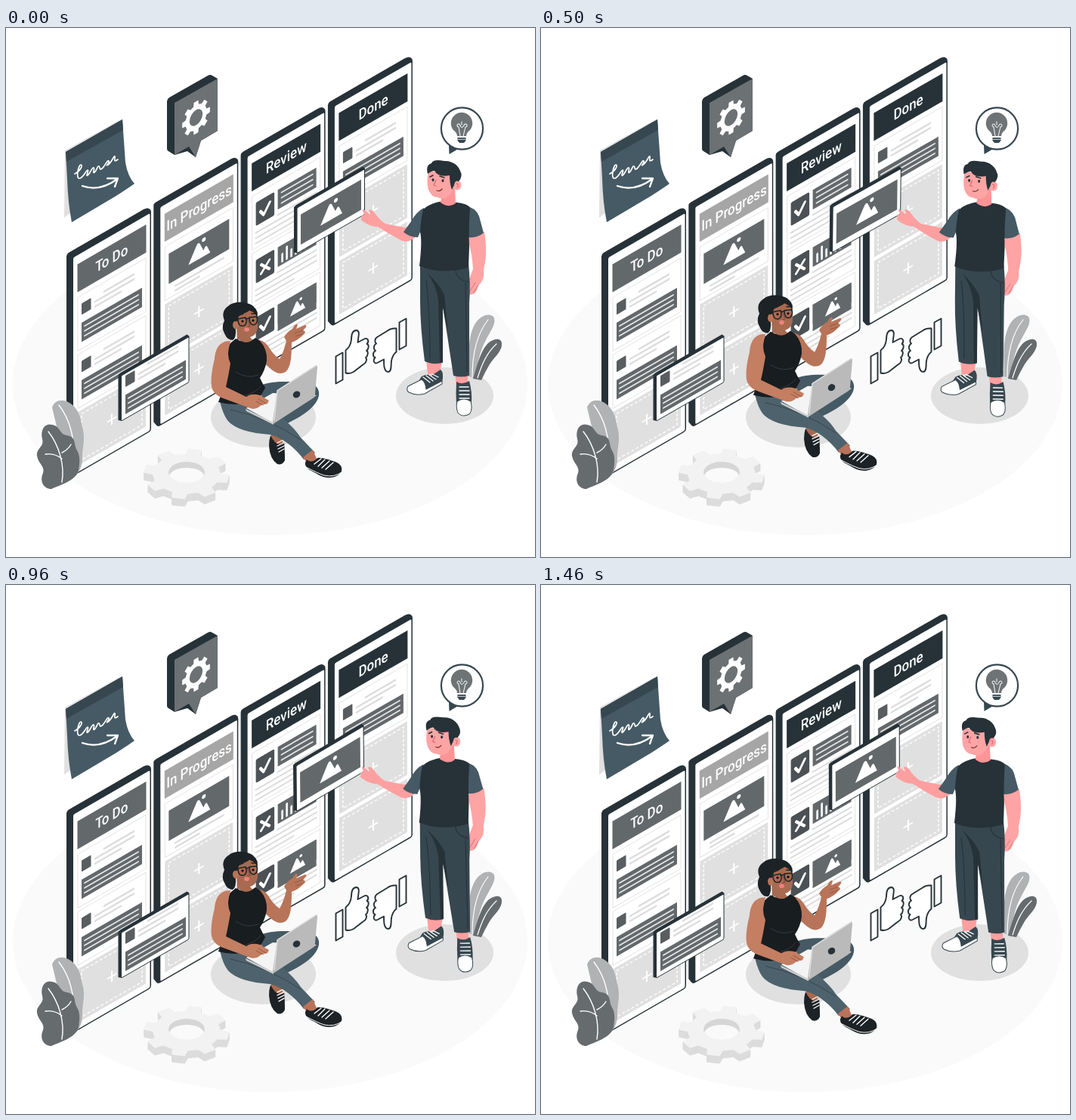
These frames come from a looping animation (700x700 px, 1500 ms). An HTML page:

```html
<!DOCTYPE html>
<html lang="en">
<head>
<meta charset="utf-8">
<title>Task board</title>
<style>
html,body{margin:0;width:100%;height:100%;overflow:hidden;background:#fff}
svg{display:block;width:100vw;height:100vh}
text{font:500 19.6px Roboto,Arial,sans-serif;fill:#fff;text-anchor:middle}
.line{fill:none;stroke-linecap:round;stroke-linejoin:round}
.w{stroke:#fff}
.d{stroke:#263238}
</style>
</head>
<body>
<svg viewBox="0 0 700 700">
<defs>
  <g id="board">
    <path fill="#263238" d="M0 3Q0 0 3 0H102Q107 0 110 4Q112 6 112 9V296Q112 299 109 299H9Q6 299 4 296L0 289Z"/>
    <rect x="9" y="10" width="101.5" height="287.3" rx="2" fill="#fff"/>
  </g>
  <rect id="frame" x="15" y="66" width="90" height="71" fill="#fff" stroke="#e4e4e4"/>
  <g id="notes">
    <rect x="20" y="77" width="12.5" height="15" rx="1" fill="#585d60"/>
    <path class="line" stroke="#dcdcdc" stroke-width="2.6" d="M50 78.500H89M38 85H89M38 91.500H72"/>
    <rect x="20" y="102.500" width="80" height="25.500" fill="#63686b"/>
    <path class="line" stroke="#e6e6e6" stroke-width="2" d="M24 109H95M24 115.500H95M24 122H95"/>
  </g>
  <g id="textCard"><use href="#frame"/><use href="#notes"/></g>
  <g id="peaks" fill="#fff">
    <path d="M-14 10L-3-10Q-1-13 1-10L6 2L8-1Q10-3 11 0L15 10Z"/>
    <circle cx="6.500" cy="-12" r="2.600"/>
  </g>
  <g id="picture">
    <rect x="20" y="78" width="80" height="40" fill="#63686b"/>
    <use href="#peaks" x="60" y="98"/>
  </g>
  <g id="imageCard">
    <use href="#frame"/><use href="#picture"/>
    <path class="line" stroke="#dcdcdc" stroke-width="2.600" d="M29 125.500H92M29 131.500H60"/>
  </g>
  <g id="slot">
    <rect x="15" y="66" width="90" height="71" fill="#e0e0e0"/>
    <rect x="20" y="71" width="80" height="61" fill="none" class="w" stroke-width="1.500" stroke-dasharray="3.500 2.500"/>
    <path class="line w" stroke-width="2" d="M54.500 101.500H65.500M60 95V108"/>
  </g>
  <g id="reviewCard">
    <use href="#frame"/>
    <rect x="20" y="77" width="24.500" height="31" rx="2" fill="#4b5155"/>
    <rect x="49" y="77" width="51" height="26" fill="#63686b"/>
    <path class="line" stroke="#dcdcdc" stroke-width="2.300" d="M49 110H100M20 117H100M20 124H100M20 131H70"/>
  </g>
  <path id="tick" class="line w" stroke-width="3.600" d="M26 92L30.500 99L38.500 87"/>
  <g id="panel">
    <path fill="#263238" d="M0 1L3 0H91L94 4V63Q94 65 92 65H5L0 61Z"/>
    <rect x="4.500" y="5" width="88.500" height="59" rx="1" fill="#fff"/>
  </g>
</defs>

<rect width="700" height="700" fill="#fff"/>
<ellipse cx="349.500" cy="471" rx="340.500" ry="200" fill="#fafafa"/>
<ellipse cx="340.500" cy="515" rx="69.500" ry="40" fill="#e0e0e0"/>
<ellipse cx="580.500" cy="486.500" rx="64.500" ry="37.500" fill="#e0e0e0"/>

<g class="column">
  <rect x="14.500" y="22" width="91" height="37" fill="#63686b"/>
  <text x="69" y="47" transform="scale(.866 1)">To Do</text>
  <use href="#textCard"/><use href="#textCard" y="76"/><use href="#slot" y="152"/>
</g>
<g class="column">
  <rect x="14.500" y="22" width="91" height="37" fill="#a6a6a6"/>
  <text x="69.500" y="47" transform="scale(.866 1)">In Progress</text>
  <use href="#imageCard"/><use href="#slot" y="76"/><use href="#slot" y="152"/>
</g>
<g class="column">
  <rect x="14.500" y="22" width="91" height="37" fill="#263238"/>
  <text x="69.500" y="47" transform="scale(.866 1)">Review</text>
  <use href="#reviewCard"/><use href="#reviewCard" y="76"/><use href="#reviewCard" y="152"/>
  <use href="#tick"/><use href="#tick" y="152"/>
  <path class="line" stroke="#e6e6e6" stroke-width="2" d="M54 83H95M54 90H95M54 97H95"/>
  <path class="line w" stroke-width="3.400" d="M27 163L38 175M38 163L27 175"/>
  <path class="line w" stroke-width="2.600" stroke-linecap="butt" d="M55 175V165M61 175V159M67 175V166M73 175V161M79 175V167M85 175V160"/>
  <rect x="49" y="229" width="51" height="35" fill="#63686b"/>
  <use href="#peaks" transform="translate(75 247) scale(.7)"/>
</g>
<g class="column">
  <rect x="14.500" y="22" width="91" height="37" fill="#263238"/>
  <text x="69.500" y="47" transform="scale(.866 1)">Done</text>
  <use href="#textCard"/><use href="#slot" y="76"/><use href="#slot" y="152"/>
</g>
<g transform="translate(148.500 458) skewY(-30)">
  <use href="#panel"/><use href="#notes" x="-10.500" y="-69.500"/>
</g>

<!-- sticky note -->
<path fill="#e0e0e0" d="M78 162L150 122L154 190L77 251Z"/>
<path fill="#455a64" d="M79 164L154 121L158 178Q161 196 170 206Q160 213 146 222L87 257Q82 232 81 200Z"/>
<path fill="#37474f" d="M79 164L154 121L155 135L80 177Z"/>
<path class="line w" stroke-width="1.700" d="M91 193C99 189 102 181 99 181S92 199 97 199S106 188 108 188S105 197 108 195S114 184 116 185S114 193 117 191S121 182 123 183S123 189 127 186S134 174 136 176S130 184 135 181S143 168 144 170S141 179 148 174"/>
<path class="line w" stroke-width="2.300" d="M101 209Q124 217 147 200M134 199L148 199L144 210"/>

<!-- settings bubble -->
<path fill="#263238" d="M213 97Q213 94 216 92L267 63Q270 61 273 63L280 67V136L258 149L251 171L240 163L223 168L215 163Q213 162 213 160Z"/>
<path fill="#6c7173" d="M223 99L280 67V136L258 149L251 171L242 157L223 168Z"/>
<path id="cog" fill="#fff" fill-rule="evenodd" transform="translate(251.500 118.500) skewY(-30) scale(.866 1)"/>

<!-- floor gear -->
<g id="floorGear"></g>
<ellipse cx="239" cy="588" rx="24" ry="14" fill="#d6d6d6"/>
<path fill="#fafafa" d="M216 592Q221 582 239 582T262 592Q256 602 239 602T216 592Z"/>

<!-- plants -->
<path fill="#b0b2b3" d="M61 502C65 491 77 490 87 498C99 508 99 521 102 532C105 548 100 558 101 570C101 583 94 593 84 599Z"/>
<path class="line" stroke="#fff" stroke-width="1.400" d="M70 499C88 522 93 555 88 585"/>
<path fill="#666b6e" d="M60 610C50 610 44 600 49 589C52 580 43 577 41 566C40 556 51 554 48 544C45 531 52 522 61 525C72 527 70 537 80 539C94 541 89 551 94 559C99 567 97 578 96 585C93 599 71 605 60 610Z"/>
<path class="line w" stroke-width="1.400" d="M56 534C70 552 78 578 74 601M52 564Q64 562 74 570M86 551Q82 558 74 562"/>
<path fill="#b0b2b3" d="M613 461C612 432 611 407 621 391C627 381 639 376 645 382C650 390 641 401 635 413C627 427 623 447 621 464Z"/>
<path class="line w" stroke-width="1.200" d="M638 386C622 406 617 433 617 462"/>
<path fill="#666b6e" d="M618 464C624 444 628 428 637 418C644 411 655 409 656 417C657 428 646 435 640 445Q634 455 629 466Z"/>
<path class="line w" stroke-width="1.200" d="M649 418C635 431 629 447 624 463"/>

<!-- thumbs -->
<g class="line d" stroke-width="1.900" style="fill:#fff">
  <path d="M436.500 434.500L445.500 429.500V465.500L436.500 470.500Z"/>
  <path d="M449.500 426.500Q456 422 457 412C457 404 459 400 464 400C469 401 466 409 465.500 416L474 411.500C479 409 481 415 477.500 418C481 419 480 425 477 427C480 428 479 434 476 436C478 438 477 443 473 445L460 455Q455 458 449.500 456.500Z"/>
  <path d="M520.500 389.500L529.500 384.500V420.500L520.500 425.500Z"/>
  <path d="M516.500 397.500Q510 397 505 400.500L492 408.500C487 411 488 416 490 417.500C486 420 486 425 489 427C485 429 485 435 488.500 436C485 440 487 445 491.500 443L500 438.500C500 446 500 455 506 455C511 454 509 445 510 441Q511 433 516.500 428.500Z"/>
</g>

<!-- seated woman -->
<g id="woman">
  <path fill="#455a64" d="M335 474C351 466 372 468 394 469C411 469 417 479 413 490C407 505 388 516 364 527L369 541L350 538L343 505Z"/>
  <path fill="#a96a4f" d="M351 537L367 542L365 553L351 548Z"/>
  <path fill="#1c2225" d="M350 539Q348 545 348 553Q349 570 359 577Q366 579 369 572Q369 558 368 548Q359 557 350 539Z"/>
  <path class="line w" stroke-width="1.300" d="M359 549L367 545M359 553L368 549M360 557L368 553M361 561L368 557"/>
  <path fill="#4d626c" d="M283 494C292 486 322 486 342 499C360 511 380 526 390 542L409 562L394 571C381 554 366 542 349 538C323 536 303 531 293 519Q287 511 283 494Z"/>
  <path class="line" stroke="#37474f" d="M297 505Q345 515 390 545"/>
  <path fill="#b8735a" d="M393 568L406 558L411 570L400 578Z"/>
  <path fill="#1c2225" d="M398 571Q404 577 412 569C419 568 429 572 438 575Q446 579 444 587C438 596 425 597 415 592C406 586 395 584 396 575Z"/>
  <path class="line w" stroke-width="1.400" d="M408 577L417 570M413 580L422 571M418 582L428 573M423 584L433 575"/>
  <path class="line w" stroke-width="1" d="M397 581Q412 589 421 592Q434 595 444 588"/>

  <path fill="#b87459" d="M328 412Q341 412 347 421Q354 433 362 438Q367 430 371 414L368 409Q371 403 379 398Q384 389 386 393L384 398L396 393Q400 394 393 400Q399 402 393 406Q387 413 378 416C378 435 377 449 370 455Q361 461 349 450L336 438Z"/>
  <path class="line" stroke="#955a42" d="M382 404L393 400M383 408L393 405"/>
  <path fill="#181d20" d="M296 418L304 411Q318 420 330 410L336 414Q346 425 345 440Q343 453 336 463Q339 470 343 476L337 487Q314 504 281 495Q290 472 292 452Q291 434 296 418Z"/>
  <path class="line" stroke="#343b40" d="M304 455Q318 465 334 459M317 486Q330 483 337 474"/>
  <path fill="#1c2225" d="M290 406Q284 397 289 387Q284 375 294 368C303 360 321 362 328 369Q335 375 332 384L304 397Q305 411 300 413Q293 413 290 406Z"/>
  <path fill="#a86a50" d="M305 391Q309 374 319 372L331 378L333 391Q334 406 323 409L326 413Q318 420 306 411Z"/>
  <ellipse cx="304" cy="393" rx="4" ry="5.500" fill="#b87459"/>
  <path fill="#1c2225" d="M303 389Q307 386 307 379Q317 379 324 372L332 381Q333 369 320 366L303 372Z"/>
  <path class="line" stroke="#874f3a" stroke-width="1.500" d="M320 386L323 394L320 395"/>
  <path class="line" stroke="#1c2225" stroke-width="1.500" d="M307 385L317 383Q320 391 315 394Q307 396 307 385ZM322 383L332 382Q334 391 328 393Q322 393 322 383ZM317 385L322 384M300 387L307 386M309 380L314 378M325 378L330 378"/>
  <circle cx="313" cy="388" r="1.500"/><circle cx="327" cy="387" r="1.500"/>
  <ellipse cx="318.500" cy="399" rx="3.400" ry="2.800" fill="#ed827e"/>

  <path fill="#f4f4f4" d="M318 503L353 483L411 486L354 523Z"/>
  <path fill="#cfcfcf" d="M317 504L354 522V525L318 507Z"/>
  <path fill="#bababa" d="M359 479L409 447Q412 445 412 449L409 484Q409 488 406 490L355 523Q353 524 353 520Z"/>
  <path class="line" stroke="#dedede" stroke-width="1.500" d="M355 519L359 480L410 447"/>
  <ellipse cx="384.500" cy="485" rx="5" ry="4.300" transform="rotate(-35 384.500 485)" fill="#263238"/>
  <path fill="#c47e62" d="M297 414C282 414 277 425 276 438C272 453 270 470 273 478Q277 487 290 491L323 503Q330 506 338 499L346 497L348 493L336 486Q325 483 318 488L291 475Q294 462 297 444Q291 432 297 414Z"/>
  <path class="line" stroke="#955a42" d="M334 491L344 497M331 494L340 499"/>
</g>

<!-- standing man -->
<g id="man">
  <g transform="translate(381 236) skewY(-30)">
    <use href="#panel"/><use href="#picture" x="-11" y="-62"/>
  </g>
  <path fill="#ff9fa0" d="M534 265Q515 262 502 259Q494 254 488 245Q484 239 480 241L482 247L473 240Q470 241 475 247Q468 247 471 251Q467 253 474 257Q483 263 492 263Q509 274 525 282Q537 285 548 269Z"/>
  <path fill="#ffa4a5" d="M614 272L633 270C636 289 636 304 632 320Q634 333 625 341Q623 352 615 353L611 349Q609 341 613 332L618 319Q617 301 612 282Z"/>
  <path class="line" stroke="#df7c80" d="M614 348L621 337M619 350L625 340"/>
  <path fill="#ff9fa0" d="M556 439L577 440L574 458L558 458ZM594 456H611V474H596Z"/>
  <path fill="#37474f" d="M550 461Q558 457 563 460L575 452Q580 456 577 469Q566 476 555 482L537 481Z"/>
  <path fill="#fff" stroke="#37474f" d="M550 465L532 474Q529 479 533 482Q543 487 554 484L577 471V467L556 478Q555 468 550 465Z"/>
  <path class="line w" stroke-width="1.300" d="M552 462L561 469M556 460L565 467M560 459L569 465M564 458L572 462"/>
  <path fill="#37474f" d="M596 468Q604 473 613 467Q617 481 616 497L596 499Q595 483 596 468Z"/>
  <path fill="#fff" stroke="#37474f" d="M597 494Q606 488 615 494Q618 506 613 511Q604 516 598 509Q595 502 597 494Z"/>
  <path class="line w" stroke-width="1.400" d="M600 475H612M600 480H613M600 485H613M600 490H613"/>
  <path fill="#37474f" d="M548 312H612Q615 338 613 365V460Q602 463 592 460L577 361L578 443Q564 446 554 441Q548 395 548 360Z"/>
  <path fill="#263238" d="M557 324Q572 337 580 353L585 402L578 370L578 442L574 443L572 360Q569 339 557 324Z"/>
  <path class="line" stroke="#23313a" d="M595 321Q596 333 612 336M608 337L610 456M556 334Q561 373 561 437"/>
  <path fill="#455a64" d="M553 238Q543 243 536 256L526 270Q534 277 545 277L553 258ZM606 234Q622 238 626 249L632 271Q624 278 612 277Z"/>
  <path fill="#263238" d="M552 240Q560 232 578 229L597 231Q613 233 614 239Q612 265 613 289L612 317Q576 327 547 315Q551 282 548 270Q549 252 552 240Z"/>
  <path fill="#ff9496" d="M577 216L594 211L595 232Q586 239 575 231Z"/>
  <path fill="#ffa4a5" d="M559 190L591 190L592 212C588 224 580 228 571 224Q563 224 559 214Q556 204 559 190Z"/>
  <ellipse cx="597" cy="208" rx="5.500" ry="6.500" fill="#ffa4a5"/>
  <path fill="#263238" d="M558 193Q555 181 563 179Q565 173 580 176C590 175 599 182 601 189Q605 196 599 203Q594 201 593 208L590 214Q587 206 587 195Q572 198 567 189Q563 189 558 193Z"/>
  <path class="line d" stroke-width="1.600" d="M561 197L565 195M574 196L580 198"/>
  <ellipse cx="565" cy="201" rx="1.500" ry="2" fill="#263238"/>
  <ellipse cx="578" cy="202" rx="1.500" ry="2" fill="#263238"/>
  <path class="line" stroke="#dd6f73" stroke-width="1.300" d="M569 201L566 208L569 209M596 206Q600 206 597 211"/>
  <path class="line" stroke="#7b373a" stroke-width="1.300" d="M570 215Q574 217 577 213"/>
</g>

<!-- idea bubble -->
<g id="idea">
  <path fill="#37474f" d="M586 155L586.500 167L600 159Z"/>
  <circle cx="603.500" cy="133" r="27.600" fill="#fff" stroke="#37474f" stroke-width="2.200"/>
  <path fill="#6e7375" d="M597 143Q597 139 592 135A14.200 14.200 0 1 1 614 135Q609 139 609 143Z"/>
  <path class="line w" d="M601 143L599 131M605 143L608 131M599 131A2 2 0 1 1 601 129Q603 134 606 129A2 2 0 1 1 608 131M603 124V128"/>
  <path fill="#37474f" d="M597.500 145H608.500V149L606 152H600L597.500 149Z"/>
  <path class="line w" stroke-width=".8" d="M598 147.300H608"/>
</g>
</svg>
<script>
const $ = id => document.getElementById(id);
const SVG = 'http://www.w3.org/2000/svg';

function gear(outer, inner, teeth, turn = 0) {
  const step = 2 * Math.PI / teeth;
  const points = [];
  for (let i = 0; i < teeth; i++)
    for (const [offset, r] of [[-.3, inner], [-.2, outer], [.2, outer], [.3, inner]]) {
      const a = (i + offset) * step + turn;
      points.push(`${(r * Math.cos(a)).toFixed(1)} ${(r * Math.sin(a)).toFixed(1)}`);
    }
  return `M${points.join('L')}Z`;
}

const hole = r => `M${r} 0A${r} ${r} 0 1 0 ${-r} 0A${r} ${r} 0 1 0 ${r} 0Z`;
$('cog').setAttribute('d', gear(21.5, 16.5, 8) + hole(10));

// Stacked layers give the gear its thickness
for (let depth = 10; depth >= 0; depth--) {
  const layer = document.createElementNS(SVG, 'path');
  layer.setAttribute('d', gear(57, 45, 8, .2));
  layer.setAttribute('fill', depth ? '#dcdcdc' : '#f2f2f2');
  layer.setAttribute('transform', `translate(239 ${590 + depth}) scale(1 .59)`);
  $('floorGear').append(layer);
}

document.querySelectorAll('.column').forEach((column, i) => {
  column.setAttribute('transform', `translate(${80 + 115.3 * i} ${299 - 66.7 * i}) skewY(-30)`);
  const board = document.createElementNS(SVG, 'use');
  board.setAttribute('href', '#board');
  column.prepend(board);
});

function track(p, keys) {
  const i = keys.findIndex(key => p < key[0]);
  const [p0, v0] = keys[i - 1], [p1, v1] = keys[i];
  return v0 + (v1 - v0) * (p - p0) / (p1 - p0);
}

const FLOAT = [[0, 0], [.5, -14], [1, 0]];
const SWAY = [[0, 0], [.25, 1], [.75, -1], [1, 0]];
const BEAT = [[0, 1], [.1, 1.1], [.3, 1], [.4, 1], [.5, 1.1], [.6, 1], [1, 1]];

function draw() {
  const p = performance.now() % 1500 / 1500;
  $('woman').setAttribute('transform', `translate(0 ${track(p, FLOAT)})`);
  $('man').setAttribute('transform', `rotate(${track(p, SWAY)} 507.5 343)`);
  $('idea').setAttribute('transform', `translate(603.5 135) scale(${track(p, BEAT)}) translate(-603.5 -135)`);
  requestAnimationFrame(draw);
}
draw();
</script>
</body>
</html>
```
